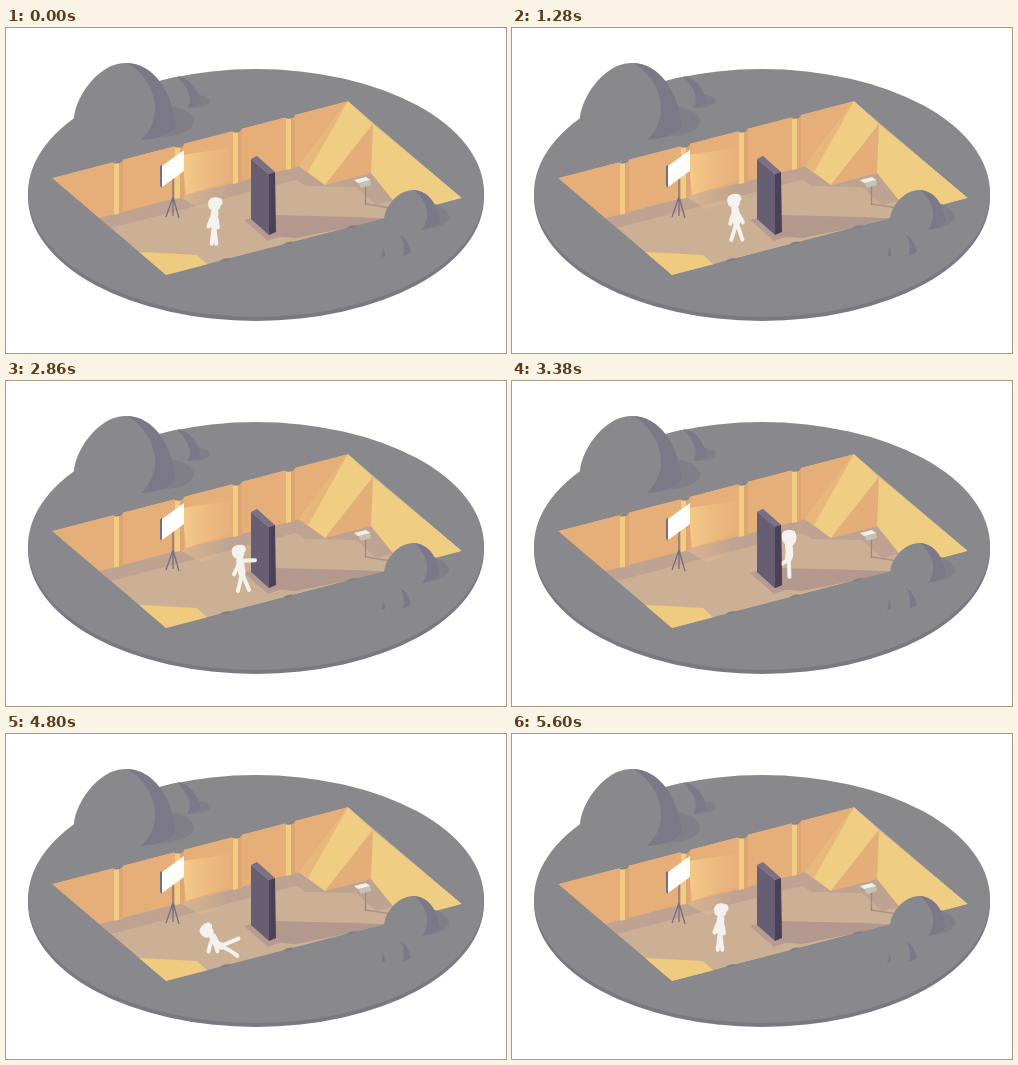
Animation, 500 px wide and 325 px high, one loop 6.8 s. Source, as an HTML page:

```html
<!DOCTYPE html>
<html lang="en">
<head>
<meta charset="utf-8">
<title>Through the wall</title>
<style>
  html, body { margin: 0; width: 100%; height: 100%; overflow: hidden; background: #fff; }
  svg { display: block; width: 100%; height: 100%; }
</style>
</head>
<body>
<svg viewBox="0 0 500 325">
  <defs>
    <linearGradient id="glow">
      <stop offset="0" stop-color="#f8d08b" stop-opacity=".85"/>
      <stop offset="1" stop-color="#f2c288" stop-opacity=".15"/>
    </linearGradient>
    <linearGradient id="floorGlow">
      <stop offset="0" stop-color="#e6bd8c" stop-opacity=".7"/>
      <stop offset="1" stop-color="#e6bd8c" stop-opacity="0"/>
    </linearGradient>
    <clipPath id="pit"><path d="M46 150L342 73L456 170L160 247Z"/></clipPath>
    <g id="post">
      <path d="M-4 1H1V53L-4 54Z" fill="#f1cc83"/>
      <path d="M1 0H5V52L1 53Z" fill="#dfa573"/>
      <path d="M-5 1.300L5 -1.300Q4 2 0 2.500Q-4 3 -5 1.300Z" fill="#84838a"/>
    </g>
    <path id="notch" d="M-5 2V1Q0 -2.500 5 -1V0Z" fill="#807e87"/>
  </defs>

  <!-- Ground -->
  <ellipse cx="250" cy="169" rx="228" ry="124" fill="#7b7883"/>
  <ellipse cx="250" cy="165" rx="228" ry="124" fill="#89888c"/>

  <!-- Left rocks -->
  <ellipse cx="184" cy="73" rx="20" ry="7" fill="#807f87"/>
  <path d="M160 53Q168 47 178 50Q190 58 195 76L181 80H155Z" fill="#89888c"/>
  <path d="M171 48Q190 51 195 76L181 80Q190 68 171 48Z" fill="#7b7987"/>
  <path d="M165 78Q187 82 188 94Q185 108 150 109L135 112Z" fill="#807f87"/>
  <path d="M68 95C66 72 93 33 121 35C147 36 166 62 170 98Q162 111 135 112H80Z" fill="#89888c"/>
  <path d="M121 35C147 36 166 62 170 98Q163 110 135 112C163 86 145 48 121 35Z" fill="#7b7987"/>

  <!-- Pit -->
  <g clip-path="url(#pit)">
    <path d="M46 150L342 73L456 170L160 247Z" fill="#ccb096"/>
    <path d="M93 190L293 138L319 157L365 145L394 171L370 177L350 159L300 158L290 152L105 200Z" fill="#bfa392"/>
    <path d="M46 150L342 73L293 138L93 190Z" fill="#e6ae79"/>
    <path d="M176 127L224 120V153L180 167Z" fill="url(#glow)"/>
    <path d="M174 169L224 156L212 176L195 181Z" fill="url(#floorGlow)"/>
    <path d="M342 73L293 138L319 157L367 96Z" fill="#efcd82"/>
    <path d="M342 73L293 138L302 144Z" fill="#e7b77b"/>
    <path d="M367 96L319 157L365 145Z" fill="#e5ad78"/>
    <path d="M367 96L456 170L398 186L365 145Z" fill="#efcd82"/>
    <path d="M269 187L350 189L390 191L345 199L290 210L264 208Z" fill="#b3988d"/>
    <path d="M238 192L245 190L264 207L276 208L262 213Z" fill="#b59b91"/>
    <path d="M133 224L191 227L203 238L160 249Z" fill="#efcb80"/>
  </g>
  <g id="rims"></g>

  <!-- Lamp -->
  <path d="M167 150V188M167 169L160 189M167 169L173 190" fill="none" stroke="#777079" stroke-width="1.300"/>
  <path d="M154 138L156 137V160L154 158Z" fill="#77707a"/>
  <path d="M156 138L178 122V143L156 159Z" fill="#fffefc"/>

  <!-- Detector -->
  <path d="M360 176L385 180" stroke="#aa9288" stroke-width="1.300"/>
  <path d="M359.500 157V177" stroke="#918b88" stroke-width="1.300"/>
  <path d="M352 154L364 151L365 157L355 160Z" fill="#c3c4b7"/>
  <path d="M348 152L360 149L364 152L352 155Z" fill="#f1f0e7"/>

  <!-- Right rocks -->
  <path d="M426 175Q443 181 443 190Q438 200 417 201Z" fill="#807f87"/>
  <path d="M378 192C379 176 394 161 409 162C424 164 431 177 434 193Q428 201 416 202L382 205Z" fill="#89888c"/>
  <path d="M408 162C424 164 431 177 434 193Q428 201 416 202C427 187 419 171 408 162Z" fill="#7b7987"/>
  <path d="M394 207Q402 211 405 224L397 228Q400 216 394 207ZM376 218Q379 221 379 228L375 229Q378 223 376 218Z" fill="#7b7987"/>

  <g id="wall">
    <path d="M245 131L263 146V207L245 191Z" fill="#685e74"/>
    <path d="M245 131L251 128L269 144L263 146Z" fill="#7b7186"/>
    <path d="M263 146L269 144L270 204L263 207Z" fill="#4a4057"/>
  </g>
  <g fill="none" stroke="#f4f2ef" stroke-linecap="round" stroke-linejoin="round">
    <path id="limbs" stroke-width="4"/>
    <path id="torso" stroke-width="7.500"/>
    <path id="head" fill="#f4f2ef" stroke-width="1"
      d="M-6 3Q-8 -5 -2 -6Q2 -7 6 -5L7 -1L5 1Q5 6 0 7Q-5 6 -6 3Z"/>
  </g>
  <use id="cover" href="#wall"/>
</svg>
<script>
const LOOP = 6800, STEP = 40;
const el = id => document.getElementById(id);

// Posts follow the back rim of the pit, notches the front rim.
const rim = (x, x0, y0) => y0 - (x - x0) * 77 / 296;
const mark = (shape, x, y) => `<use href="#${shape}" x="${x}" y="${y}"/>`;
el("rims").innerHTML =
  [112, 173, 231, 284].map(x => mark("post", x, rim(x, 46, 150))).join("") +
  [219, 283, 346].map(x => mark("notch", x, rim(x, 160, 247))).join("");

// Each pair of limbs has a mean direction and a half-angle between its two limbs.
const stand = { x: 208, y: 197, lean: 3, legs: 0, spread: 7, knee: 0, arms: -6, swing: 28, elbow: 20 };
const crouch = { lean: -9, legs: 15, spread: 28, knee: -30, arms: 10, swing: 42 };

// A key changes only the properties it names.
const keys = [];
function key(time, changes = {}) {
  const last = keys.length ? keys[keys.length - 1].pose : stand;
  keys.push({ time, pose: { ...last, ...changes } });
}
key(0);
key(600);
key(1800, { x: 237, y: 191, lean: -13, legs: 5, spread: 11, arms: 15, elbow: 10 });
key(2000);
key(2120, { lean: -8, arms: 42, swing: 60, elbow: -5 });
key(2800);
key(2960, { ...crouch, x: 232, y: 193 });
key(3380, { x: 279, y: 176, lean: 0, legs: -18, spread: 18, knee: -50, arms: 180, swing: 55, elbow: 80 });
key(3520);
key(3660, { x: 291, y: 181, lean: 15, legs: 5, knee: 0, arms: 60, elbow: 20 });
key(3900, { x: 257, y: 200, lean: -20, legs: 25, spread: 40, knee: 20, arms: 15, swing: 25 });
key(4220, { x: 214, y: 214, lean: -78, legs: 85, spread: 12, knee: 0, arms: -10, swing: 40 });
key(4680);
key(4800, { x: 215, y: 212, lean: -42, legs: 90, spread: 23, knee: -15, arms: 0, swing: 22, elbow: 10 });
key(5120, { ...crouch, x: 210, y: 204 });
key(5400, stand);
key(LOOP);

function poseAt(time) {
  const next = keys.findIndex(k => k.time > time);
  const a = keys[next - 1], b = keys[next];
  const p = (time - a.time) / (b.time - a.time);
  const pose = {};
  for (const name in stand) pose[name] = a.pose[name] + (b.pose[name] - a.pose[name]) * p;
  if (time > 600 && time < 1720) {
    const pace = Math.sin((time - 600) / 560 * Math.PI) ** 2;
    pose.spread += 16 * pace;
    pose.swing += 10 * pace;
    pose.knee -= 15 * pace;
  }
  return pose;
}

function move([x, y], degrees, length) {
  const angle = degrees * Math.PI / 180;
  return [x + Math.sin(angle) * length, y + Math.cos(angle) * length];
}

function limb(start, angle, bend, upper, lower) {
  const joint = move(start, angle, upper);
  return `M${start}Q${joint} ${move(joint, angle + bend, lower)}`;
}

function draw(time) {
  const { x, y, lean, legs, spread, knee, arms, swing, elbow } = poseAt(time);
  const hip = [x, y], up = 180 - lean;
  const neck = move(hip, up, 12);
  el("limbs").setAttribute("d",
    limb(neck, arms - swing, elbow, 8, 7) + limb(neck, arms + swing, -elbow, 8, 7) +
    limb(hip, legs - spread, knee, 9, 10) + limb(hip, legs + spread, 0, 9, 10));
  el("torso").setAttribute("d", `M${neck}Q${move(hip, legs + 180, 5)} ${hip}`);
  el("head").setAttribute("transform", `translate(${move(hip, up, 21)}) rotate(${lean})`);
  el("cover").style.display = time >= 2960 && time < 3780 ? "" : "none";
}

function tick() {
  draw(Math.floor(performance.now() % LOOP / STEP) * STEP);
  requestAnimationFrame(tick);
}
tick();
</script>
</body>
</html>
```
